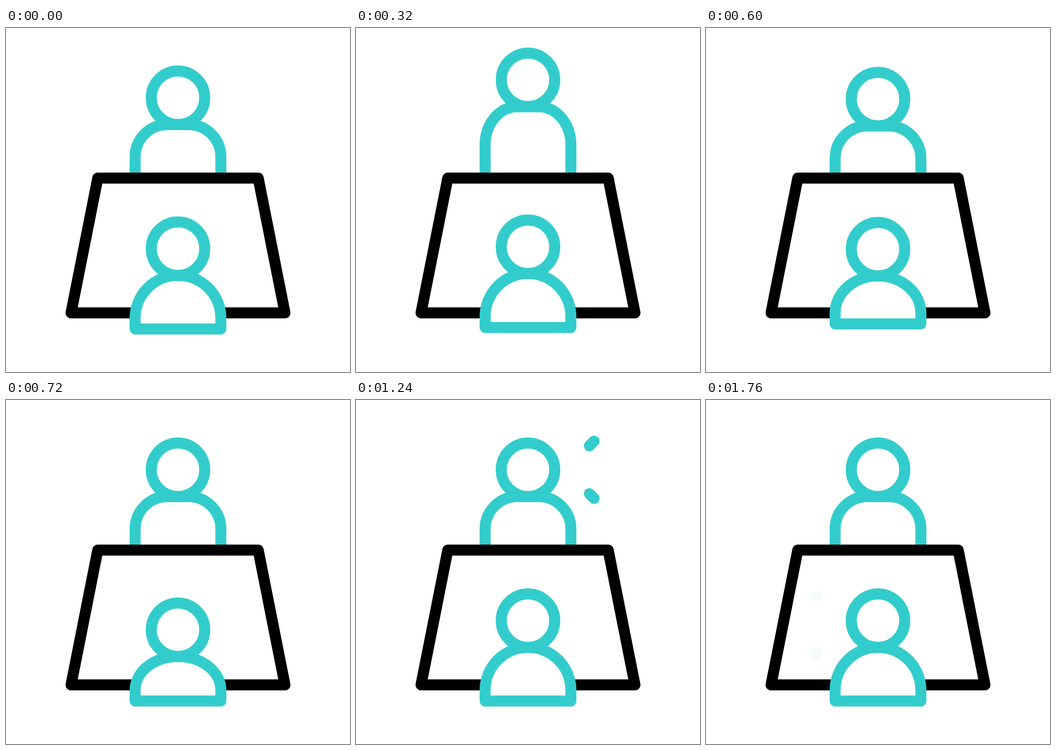
An HTML page that plays this animation: 640 px wide and 640 px high, repeating every 2 s.

```html
<!DOCTYPE html>
<html lang="en">
<head>
<meta charset="utf-8">
<title>Meeting</title>
<style>
  html, body { margin: 0; width: 100%; height: 100%; overflow: hidden; background: #fff; }
  svg { display: block; width: 100%; height: 100%; }
</style>
</head>
<body>
<svg viewBox="0 0 640 640" fill="#fff" stroke="#3cc" stroke-width="20.5" stroke-linecap="round" stroke-linejoin="round">
  <path id="farBody" stroke-linecap="butt"/>
  <circle id="farHead" cx="320" r="49.75" fill="none"/>
  <path d="M170.75 279.25H469.25L519 530H121Z" stroke="#000"/>
  <path id="nearBody"/>
  <circle id="nearHead" cx="320" r="49.75" fill="none"/>
  <path id="farMarks"/>
  <path id="nearMarks"/>
</svg>
<script>
const LOOP = 2000, STEP = 40, LAST_CHANGE = 1760;
const el = id => document.getElementById(id);

const ease = (t, from, to) => {
  const u = Math.min(1, Math.max(0, (t - from) / (to - from)));
  return u * u * (3 - 2 * u);
};

// Eased value through [time, value] keys
const track = (t, keys) => keys.slice(1).reduce(
  (v, [time, value], i) => v + (value - keys[i][1]) * ease(t, keys[i][0], time), keys[0][1]);

function drawFar(t) {
  const head = track(t, [[80, 0], [280, -39], [480, 15.7], [640, 0]]);
  const side = 240 + track(t, [[80, 0], [280, -28], [480, 18], [640, 0]]);
  const top = 179.75 + head, ry = side - top;
  el('farHead').setAttribute('cy', 129.75 + head);
  el('farBody').setAttribute('d',
    `M240.25 279V${side}A59.75 ${ry} 0 0 1 300 ${top}H340A59.75 ${ry} 0 0 1 399.75 ${side}V279`);
}

function drawNear(t) {
  const head = track(t, [[280, 0], [480, -34], [680, 20], [840, 0]]);
  const base = track(t, [[280, 0], [480, -27.3], [680, 0]]);
  const top = 460.25 + head, side = 540 + base, ry = side - top;
  el('nearHead').setAttribute('cy', 410.5 + head);
  el('nearBody').setAttribute('d',
    `M240.25 ${560 + base}V${side}A79.75 ${ry} 0 0 1 320 ${top}A79.75 ${ry} 0 0 1 399.75 ${side}V${560 + base}Z`);
}

// A mirrored pair of diagonal dashes that travel outwards, then fade
function drawMarks(id, t, x, y, dir) {
  const tail = 34 * ease(t, 80, 560), tip = 34 * ease(t, 0, 400);
  const dash = sign => {
    const point = d => `${x + dir * d} ${y + sign * (19.3 + d)}`;
    return `M${point(tail)}L${point(tip)}`;
  };
  el(id).setAttribute('d', t > 0 ? dash(-1) + dash(1) : '');
  el(id).setAttribute('opacity', 1 - ease(t, 400, 538));
}

function draw() {
  const now = (performance.now() + 0.5) % LOOP;
  const t = Math.min(LAST_CHANGE, Math.floor(now / STEP) * STEP);
  drawFar(t);
  drawNear(t);
  drawMarks('farMarks', t - 840, 409, 129.75, 1);
  drawMarks('nearMarks', t - 1240, 239.5, 418.75, -1);
  requestAnimationFrame(draw);
}
draw();
</script>
</body>
</html>
```
